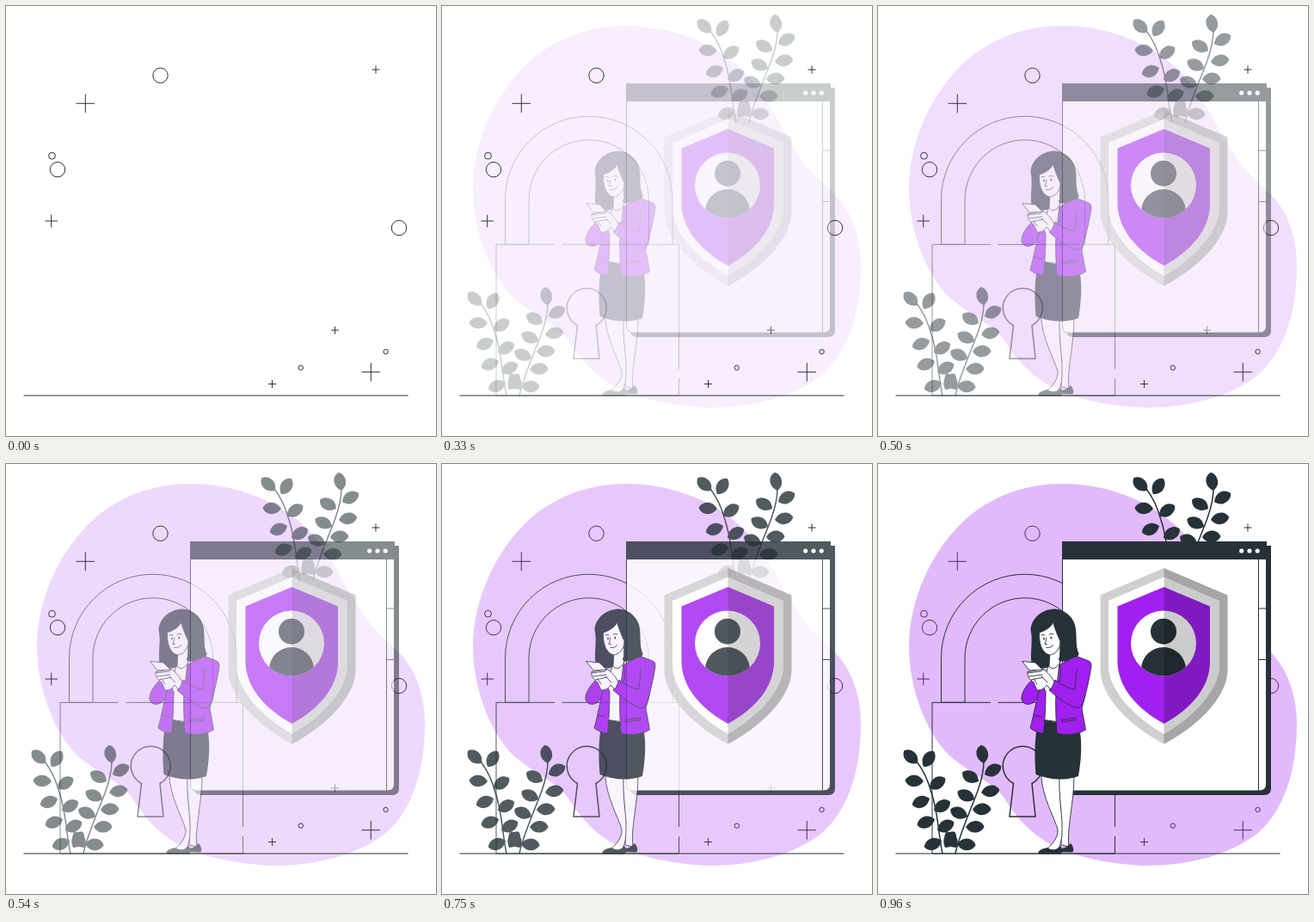
An HTML page that plays this animation: 500x500 px, repeating every 1 s.

```html
<!DOCTYPE html>
<html lang="en">
<head>
<meta charset="utf-8">
<title>Personal data protection</title>
<style>
html, body { margin: 0; width: 100%; height: 100%; overflow: hidden; background: #fff; }
svg { display: block; width: 100vw; height: 100vh; }
.line { fill: none; stroke: #263238; stroke-width: 1; }
.ink { fill: #263238; }
.white { fill: #fff; }
.purple { fill: #a020f0; }
.drawn { stroke: #263238; stroke-width: .9; stroke-linejoin: round; stroke-linecap: round; }
.fade { animation: fade 1s -4ms infinite; }

/* 24 pictures per second */
@keyframes fade {
  0%      { opacity: 0;   animation-timing-function: step-end; }
  12.5%   { opacity: .03; animation-timing-function: steps(2); }
  20.833% { opacity: .11; animation-timing-function: steps(3); }
  33.333% { opacity: .24; animation-timing-function: steps(3); }
  45.833% { opacity: .41; animation-timing-function: steps(2); }
  54.167% { opacity: .56; animation-timing-function: steps(5); }
  75%     { opacity: .8;  animation-timing-function: steps(5); }
  95.833%, 100% { opacity: 1; }
}
</style>
</head>
<body>
<svg viewBox="0 0 500 500">
  <defs>
    <path id="leaf" d="M0 0C4-6 9-8 15-6.500C19-5 21-2 21.500 0C19 5 14 7 9 6.500C5 6 2 3 0 0Z"/>
    <clipPath id="badge"><circle cx="332" cy="208.500" r="38"/></clipPath>
    <g id="plant" class="ink">
      <path class="line" style="stroke-width:1.500" d="M75 453C70 430 70 405 62 382C58 367 52 355 45 346M90 453C94 432 108 402 116 380C121 366 123 356 123 345"/>
      <use href="#leaf" transform="translate(46 348) rotate(-136)"/>
      <use href="#leaf" transform="translate(53 352) rotate(-56)"/>
      <use href="#leaf" transform="translate(53 369) rotate(184)"/>
      <use href="#leaf" transform="translate(60 377) rotate(-32)"/>
      <use href="#leaf" transform="translate(60 389) rotate(160)"/>
      <use href="#leaf" transform="translate(65 403) rotate(-28)"/>
      <use href="#leaf" transform="translate(66 413) rotate(162)"/>
      <use href="#leaf" transform="translate(69 426) rotate(-26)"/>
      <use href="#leaf" transform="translate(74 438) rotate(160)"/>
      <use href="#leaf" transform="translate(78 446) rotate(-58)"/>
      <use href="#leaf" transform="translate(123 348) rotate(-98)"/>
      <use href="#leaf" transform="translate(124 361) rotate(-26)"/>
      <use href="#leaf" transform="translate(117 369) rotate(-150)"/>
      <use href="#leaf" transform="translate(120 382) rotate(-8)"/>
      <use href="#leaf" transform="translate(112 390) rotate(-154)"/>
      <use href="#leaf" transform="translate(110 402) rotate(-2)"/>
      <use href="#leaf" transform="translate(104 410) rotate(-156)"/>
      <use href="#leaf" transform="translate(102 422) rotate(0)"/>
      <use href="#leaf" transform="translate(91 446) rotate(-122)"/>
      <use href="#leaf" transform="translate(92 442) rotate(3)"/>
    </g>
  </defs>

  <g class="line">
    <circle cx="179.500" cy="80.800" r="8.700"/>
    <circle cx="60" cy="190.200" r="8.700"/>
    <circle cx="457" cy="258" r="8.700"/>
    <circle cx="53.500" cy="174.200" r="3.900"/>
    <circle cx="342.800" cy="420.600" r="2.700"/>
    <circle cx="441.600" cy="402" r="2.700"/>
    <path d="M81.500 113.300h21.500M92.300 102.500v21.500M413.500 425.700h21.500M424.300 415v21.500M45.500 250h14.500M52.700 242.800v14.500"/>
    <path d="M425.500 74h9M430 69.500v9M378 377h9M382.500 372.500v9M305 439.500h9M309.500 435v9"/>
  </g>

  <path class="fade" fill="#a020f0" fill-opacity=".31" d="M215 23C270 23 320 45 352 77C379 104 394 144 417 177C428 194 444 207 457 219C477 240 487 270 487 302C487 353 474 400 443 428C410 455 360 467 312 467C272 466 229 457 202 443C176 429 160 409 147 389C138 373 104 358 82 338C55 310 36 260 36 212C36 160 61 102 101 65C134 36 172 23 215 23Z"/>

  <g class="fade line">
    <path d="M73.500 277V225.500A97.250 97.250 0 0 1 268 225.500V277M101 277V225.500A69.750 69.750 0 0 1 240.500 225.500V277"/>
    <path d="M131 277.300H63V453H275.500V433M139.500 277.300H275.500V422M73.500 277.300H101"/>
    <path stroke-width="1.500" d="M157.500 371.500A23 23 0 1 1 179 371.500L183 410H153Z"/>
  </g>

  <use class="fade" href="#plant"/>
  <use class="fade" href="#plant" x="267" y="-317"/>

  <g class="fade">
    <path class="ink" d="M219 95H457V377Q457 385 449 385H227Q219 385 219 377Z"/>
    <path class="white line" style="fill:#fff" d="M214.500 90.500H451.500V372Q451.500 380 443.500 380H222.500Q214.500 380 214.500 372Z"/>
    <path class="line" d="M442.500 111V380M442.500 168H451.500M442.500 227.500H451.500"/>
    <path class="ink" d="M214 90H452V111H214Z"/>
    <g class="white">
      <circle cx="422.700" cy="101" r="2.600"/>
      <circle cx="432" cy="101" r="2.600"/>
      <circle cx="441.200" cy="101" r="2.600"/>
    </g>
  </g>

  <g class="fade">
    <path fill="#cfcfcf" d="M332.500 121L406.500 152.500V240C406 272 370 306 332.500 325.500C295 306 259 272 258.500 240V152.500Z"/>
    <path class="white" d="M332.500 131.500L397 159V236C396 264 366 295 332.500 314C299 295 269 264 268 236V159Z"/>
    <path class="purple" d="M332.500 143L386 165.500V230C386 259 365 284 332.500 302C300 284 279 259 278.500 230V165.500Z"/>
    <circle class="white" cx="332" cy="208.500" r="38"/>
    <g class="ink" clip-path="url(#badge)">
      <circle cx="332" cy="194.700" r="15"/>
      <path d="M306 250V239A26 26 0 0 1 358 239V250Z"/>
    </g>
    <path fill-opacity=".2" d="M332.500 121L406.500 152.500V240C406 272 370 306 332.500 325.500Z"/>
  </g>

  <g class="fade">
    <g class="drawn white">
      <path d="M209 362C211 385 214 412 213 443L222 445C219 425 228 395 228 362Z"/>
      <path d="M189.500 360C191 388 204 408 209 425C210 434 202 443 195 449L209 449C214 440 214 432 214 420C214 405 210 388 211 362Z"/>
    </g>
    <path class="ink" d="M213 447C217 447 221 444 224 441C228 446 228 450 226 451.500H211Z"/>
    <path class="ink" d="M186 452C188 448 193 447 197 446C202 450 208 449 212 444C215 448 215 452 212 453.500H188Z"/>
    <path class="ink" d="M187 296L234 306C238 325 236 346 233 363C216 369 198 367 183.500 361C181.500 338 182 315 187 296Z"/>

    <path class="ink" d="M180 237C175 223 181 208 177.500 193C178 180 190 169 205 168.500C217 169 226 177 229 187C232 197 229 212 233.500 221C230 229 221 231 214 229L202 235C194 238 186 239 180 237Z"/>
    <path class="drawn white" d="M200 217L199 234C192 246 192 280 190 297L211 300V242L212 208Z"/>
    <path class="drawn white" d="M187.500 196C194 194 201 190 203.500 184C206 192 209 200 212 206C212 215 206 222 199 222C190 219 187 208 187.500 196Z"/>
    <path class="ink" d="M211 203C214 211 213 222 209.500 227.500C221 232 231 228 233.500 221L226 200Z"/>
    <path class="line drawn" d="M190 199Q192 197.500 194 199M199 198Q201 196.500 204 198M196 202C195 206 194.500 208 194 209.500H196.500M196 213.500Q201 214.500 203.500 210.500M198 234Q204 243 211 232"/>
    <ellipse class="ink" cx="193" cy="203" rx=".9" ry="1.500"/>
    <ellipse class="ink" cx="201.300" cy="202" rx=".9" ry="1.500"/>

    <g class="drawn purple">
      <path d="M182 249C173 255 166 267 167 274C169 280 176 281 181 277C186 273 189 267 191 261Z"/>
      <path d="M190 255C184 273 181 293 177 307C182 311 187 313 192.500 313C194 299 195 282 195 265Z"/>
      <path d="M211 234C217 230 225 225 232 224L245 229Q248.500 230 248 235C246 250 241 270 237 284L241.500 309C232 315 218 316 208 313C207 297 206 280 207 265Z"/>
      <path d="M231 239C230 250 230 257 228.500 262C219 260 212 256 206 251L199 263C208 271 220 280 230 283.500C236 285 239 278 241 268"/>
      <path fill="none" d="M211 234C214 242 212 250 211 254M213 298L231 295M213.500 300L231 297.500M181 292L190 294"/>
    </g>

    <g class="drawn white">
      <path d="M174 242C173 247 177 251 181 254L185 263C190 263 194 261 196 257L201 262L205 254C202 247 196 240 190 238L184 240Z"/>
      <path d="M168 229.500L183 231L191.500 239.500L176.500 240Z"/>
      <path fill="none" d="M174 243L190 241M176 247L191 245M178 251L192 248M190 247L197 254M185 256L181 250"/>
    </g>
  </g>

  <path class="line" d="M20.500 453H467.500"/>
</svg>
</body>
</html>
```
